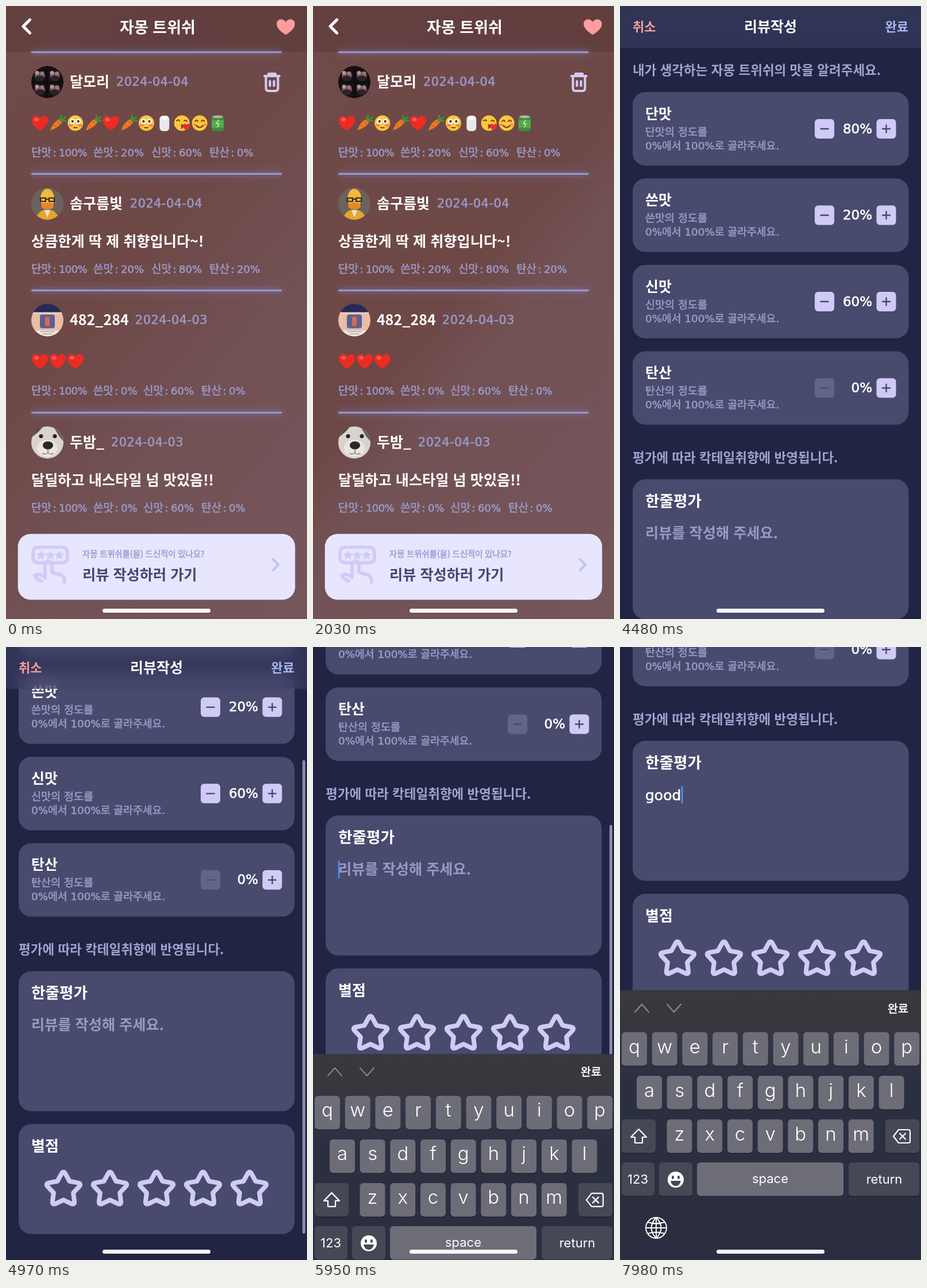
Recreate the animation shown at these times as an HTML page. Size 524 by 1068 pixels, loop 8 s.

```html
<!DOCTYPE html>
<html lang="ko">
<head>
<meta charset="utf-8">
<title>리뷰작성</title>
<style>
html, body { margin: 0; width: 100%; height: 100%; overflow: hidden; background: #212442; }
#stage { position: absolute; left: 0; top: 0; width: 524px; height: 1068px; overflow: hidden; }
#stage > *, #write > * { position: absolute; left: 0; top: 0; display: block; }
#review, #write { width: 524px; height: 1068px; overflow: hidden; }
#write { background: #212442; }
#head { width: 524px; height: 73px; background: rgba(62,67,102,.55); backdrop-filter: blur(11px); }
#bar { left: 516px; width: 5px; height: 825px; border-radius: 3px; background: #8b8ca8; }
#home { left: 168px; top: 1050px; width: 188px; height: 7px; border-radius: 4px; background: #f6f5f8; }
text { font-family: 'Noto Sans CJK KR', 'Noto Sans CJK', sans-serif; font-weight: 700; white-space: pre; }
.mix { font-family: 'DejaVu Sans', 'Noto Sans CJK KR', 'Noto Sans CJK', sans-serif; }
.mix, .mid { font-weight: 400; stroke-width: .65px; }
.key { font-family: Inter, sans-serif; font-weight: 300; }
.cap { font-family: Inter, sans-serif; font-weight: 400; }
</style>
</head>
<body>
<div id="stage">
  <div id="review"></div>
  <div id="write">
    <div id="page"></div>
    <div id="head"></div>
    <div id="bar"></div>
  </div>
  <div id="keys"></div>
  <div id="home"></div>
</div>
<script>
const $ = id => document.getElementById(id);
const svg = (h, body) => `<svg width="524" height="${h}" style="display:block">${body}</svg>`;
// The mix and mid classes get a thin outline for a medium weight
const text = (x, y, size, fill, s, cls = '', more = '') =>
  `<text x="${x}" y="${y}" font-size="${size}" fill="${fill}" class="${cls}" ` +
  `${cls[0] === 'm' ? `stroke="${fill}"` : ''} ${more}>${s}</text>`;
const rect = (x, y, w, h, r, fill) =>
  `<rect x="${x}" y="${y}" width="${w}" height="${h}" rx="${r}" fill="${fill}"/>`;
const circle = (x, y, r, fill) => `<circle cx="${x}" cy="${y}" r="${r}" fill="${fill}"/>`;
const oval = (x, y, a, b, fill) => `<ellipse cx="${x}" cy="${y}" rx="${a}" ry="${b}" fill="${fill}"/>`;
const shape = (d, fill) => `<path d="${d}" fill="${fill}"/>`;
const line = (d, color, w) =>
  `<path d="${d}" fill="none" stroke="${color}" stroke-width="${w}" stroke-linecap="round" stroke-linejoin="round"/>`;
const at = (x, y, body) => `<g transform="translate(${x} ${y})">${body}</g>`;
const MID = 'text-anchor="middle"', END = 'text-anchor="end"';

const DRINK = '자몽 트위쉬';
const LILAC = '#d0cbf6', MUTED = '#9a98c6', INK = '#45466f', CARD = '#484a6e';

// Star with softened tips, centred on 0,0
function star(R, r, soft) {
  const p = i => {
    const a = i * Math.PI / 5 - Math.PI / 2, k = i % 2 ? r : R;
    return [k * Math.cos(a), k * Math.sin(a)];
  };
  const mix = (a, b) => a.map((v, i) => (v + (b[i] - v) * soft).toFixed(2));
  let d = '';
  for (let i = 0; i < 10; i += 2) {
    const tip = p(i);
    d += `${i ? 'L' : 'M'}${mix(tip, p(i + 9))}Q${tip} ${mix(tip, p(i + 1))}L${p(i + 1)}`;
  }
  return d + 'Z';
}

/* ---- review list ---- */
const HEART = 'M0 13C-6 9-14 3-14-5C-14-14-3-15 0-8C3-15 14-14 14-5C14 3 6 9 0 13Z';
const face = circle(0, 0, 13.5, '#fcc73e');
const emoji = {
  h: shape(HEART, '#ee2b22') + oval(-6, -6, 4, 3, '#f9604f'),
  c: shape('M-13 13Q-8-2 3-7L8-2Q2 8-13 13Z', '#f07a22') + line('M-6 4l3 2M0-2l4 3', '#c9591a', 1.3) +
     line('M5-5L6-13M6-5L13-10M6-4L14-4', '#3f8f3a', 3.2),
  f: face + circle(-5, -3, 4.5, '#fff') + circle(5, -3, 4.5, '#fff') + circle(-5, -3, 2.2, '#54321b') +
     circle(5, -3, 2.2, '#54321b') + oval(-8, 4, 4, 2.5, '#f5894c') + oval(8, 4, 4, 2.5, '#f5894c') +
     line('M-3 8h6', '#7a4318', 2),
  m: rect(-8, -13, 17, 27, 6, '#e9e9ec') + oval(.5, -9, 6, 3, '#fff'),
  k: face + line('M-9-4q3-3 5 0M4-4q3-2 5 1', '#6d3c16', 2) + line('M-1 3q5 1 0 3q5 1 0 3', '#7a3a18', 1.8) +
     at(8, 7, `<g transform="scale(.45)">${shape(HEART, '#e92f2b')}</g>`),
  s: face + line('M-8-3q3-4 5 0M3-3q3-4 5 0M-6 4q6 7 12 0', '#6d3c16', 2) +
     oval(-9, 3, 3, 2, '#f5894c') + oval(9, 3, 3, 2, '#f5894c'),
  g: rect(-10, -13, 21, 27, 4, '#3d8f3c') + oval(.5, -11, 9, 2.5, '#a9b8a6') +
     rect(-10, -5, 21, 13, 0, '#55ab4b') + line('M2-5l-4 6h5l-3 6', '#c7eab5', 1.6)
};
const icons = s => [...s].map((c, i) => at(59 + 30.9 * i, 124, emoji[c])).join('');

const blob = (x, y) => oval(x, y, 9, 7, '#6f5153') + circle(x - 5, y - 5, 3.5, '#b39492') +
  circle(x + 4, y - 4, 3.5, '#96777a') + oval(x, y + 5, 8, 5, '#2a2227');
const avatars = [
  circle(0, 0, 28, '#141114') + [-13, 13].map(x => blob(x, -11) + blob(x, 13)).join('') +
    line('M0-27V27M-27 0H27', '#0c0a0c', 2),
  circle(0, 0, 28, '#6b625c') + oval(0, -9, 12, 17, '#f3b93a') + oval(0, 4, 11, 6, '#e8842a') +
    shape('M-18 21Q-12 9 0 11Q12 9 18 21Q0 35-18 21Z', '#e6a52f') + shape('M-5 11h10l-5 13z', '#eee6d8') +
    line('M-12-10h9v6h-9zM3-10h9v6h-9zM-3-8h6', '#2c2422', 2.2),
  circle(0, 0, 28, '#e9bda6') + shape('M-25-13A28 28 0 0 1 25-13Z', '#252a57') +
    rect(-25, -14, 50, 3, 0, '#f0cdb9') + rect(-13, -10, 26, 24, 4, '#596096') + rect(-4, -6, 8, 16, 2, '#d9694b') +
    shape('M-21 18H21Q12 28 0 28Q-12 28-21 18Z', '#f1ece9') + line('M-12 20h24M-8 24h16', '#b59a92', 1.5),
  circle(0, 0, 28, '#d8d4cd') + shape('M-26-10Q-21-24-8-27Q-15-18-26-10Z', '#5c4f4a') +
    shape('M12-25Q26-18 28-2L21-10Z', '#6c5d58') + oval(0, 10, 18, 15, '#e9e5df') +
    circle(-11, -11, 3.5, '#2a2325') + circle(13, -11, 3.5, '#2a2325') + oval(1, 5, 9, 7, '#2b2528') +
    line('M1 12v6q-5 4-9 1M1 18q5 4 9 1', '#8c7f79', 1.6)
];

function stats(values, y) {
  let x = 44;
  return ['단맛', '쓴맛', '신맛', '탄산'].map((name, i) => {
    const v = values[i] + '%', x0 = x;
    x += 59 + [0, 0, 28, 42, 49][v.length];
    return text(x0, y, 19, MUTED, name, 'mid') + text(x0 + 37.5, y, 18, MUTED, ':', 'mix') +
      text(x0 + 48, y, 18, MUTED, v, 'mix', v.length > 3 ? 'letter-spacing="-.6"' : '');
  }).join('');
}
const rows = [
  [80, '달모리', 192, '04', icons('hcfchcfmksg'), [100, 20, 60, 0], 182],
  [292, '솜구름빛', 216, '04', text(44, 127, 25.2, '#fff', '상큼한게 딱 제 취향입니다~!'), [100, 20, 80, 20], 173],
  [495, '482_284', 225, '03', icons('hhh'), [100, 0, 60, 0], 182],
  [708, '두밤_', 183, '03', text(44, 127, 25.2, '#fff', '달딜하고 내스타일 넘 맛있음!!'), [100, 0, 60, 0], 173]
];
const GLOW = 'drop-shadow(0 0 3px rgba(140,140,215,.5)) drop-shadow(0 0 8px rgba(140,140,215,.6))';
const list = rows.map(([y, name, dx, day, body, values, sy], i) => at(0, y,
  `<g style="filter:${GLOW}">${rect(44, -1, 436, 3, 1, '#9498cc')}</g>` +
  at(72, 52.5, avatars[i]) + text(111, 61, 25, '#fff', name) +
  text(dx, 59, 20.8, MUTED, '2024-04-' + day, 'mix', 'letter-spacing=".5"') + body + stats(values, sy))).join('');

const trash = line('M450 122H476M457 121V118H469V121M452.5 123V143Q452.5 148 457 148H469Q473.5 148 473.5 143V123' +
  'M459.5 131V139M466.5 131V139', LILAC, 4);
const tapIcon = `<g opacity=".95">${line('M57 943H97Q107 943 107 953V960Q107 970 97 970H57Q47 970 47 960V953Q47 943 57 943Z' +
  'M62 1002Q52 998 50 992Q59 987 68 996V973Q68 967 74 967Q80 967 80 973V987L95 991Q103 994 102 1004', LILAC, 6)}` +
  [61, 77, 93].map(x => at(x, 957, shape(star(9, 4.5, .1), LILAC))).join('') + '</g>';

$('review').innerHTML = svg(1068,
  rect(0, 0, 524, 80, 0, 'rgba(50,26,28,.2)') + list +
  line('M41.5 24L30 35.5L41.5 47', '#fff', 5.2) + text(264, 47, 27, '#fff', DRINK, '', MID) +
  at(487, 36.5, `<g transform="scale(1.13 1.05)">${shape(HEART, '#ff9c9e')}</g>`) + trash +
  rect(20.7, 919.8, 482.6, 114.6, 22, '#e7e6fe') + tapIcon +
  text(133, 960, 14.3, '#9da0d0', DRINK + '를(을) 드신적이 있나요?', 'mid') +
  text(133, 1000, 25.2, INK, '리뷰 작성하러 가기') +
  line('M465 964L474 973.5L465 983', '#c6c3ee', 4.2));

/* ---- review form ---- */
const button = (x, sign, off) => rect(x, 47, 34, 34, 6, off ? '#62648a' : LILAC) +
  line(`M${x + 10.5} 64h13` + (sign ? `M${x + 17} 57.5v13` : ''), off ? '#4a4b73' : INK, 2.4);
const taste = (name, value, i) => at(0, 150 + 150.5 * i,
  rect(22, 0, 480.5, 128, 22, CARD) + text(44, 46.5, 25, '#fff', name) +
  text(44, 75.5, 18.5, MUTED, name + '의 정도를', 'mix') +
  text(44, 99.5, 18.3, MUTED, '0%에서 100%로 골라주세요.', 'mix') +
  button(339, 0, !value) + button(446.5, 1) +
  text(439, 71.5, 23, '#fff', value + '%', 'mix', END));

$('page').innerHTML = svg(1420,
  text(22, 120, 22.5, '#a3a1d0', `내가 생각하는 ${DRINK}의 맛을 알려주세요.`) +
  [['단맛', 80], ['쓴맛', 20], ['신맛', 60], ['탄산', 0]].map(([n, v], i) => taste(n, v, i)).join('') +
  text(22, 795, 22.5, '#a3a1d0', '평가에 따라 칵테일취향에 반영됩니다.') +
  rect(22, 824.5, 480.5, 244, 22, CARD) + text(44, 872, 26.6, '#fff', '한줄평가') +
  text(44, 927, 25.2, MUTED, '리뷰를 작성해 주세요.', '', 'id="hint"') +
  text(44, 928, 25, '#fff', '', 'mix', 'id="typed"') +
  '<rect id="caret" y="903" width="2.6" height="31" rx="1" fill="#4b93f7"/>' +
  rect(22, 1091, 480.5, 191.5, 22, CARD) + text(44, 1139, 26, '#fff', '별점') +
  [0, 1, 2, 3, 4].map(i => at(100 + 81 * i, 1205, line(star(34, 18, .35), LILAC, 8))).join(''));

$('head').innerHTML = svg(73, text(22, 43.5, 22, '#f59b9d', '취소') +
  text(262, 44.5, 25, '#fff', '리뷰작성', '', MID) + text(502, 43.5, 22, '#a9b6f2', '완료', '', END));

/* ---- keyboard ---- */
const key = (x, y, w, fill) => rect(x, y + 1.5, w, 58.5, 6, '#1d202d') + rect(x, y, w, 58.5, 6, fill);
const LIGHT = '#6d6d78', DARK = '#464955';
const letters = [['qwertyuiop', 3, 73], ['asdfghjkl', 29, 149], ['zxcvbnm', 81.5, 225]].map(([s, x0, y]) =>
  [...s].map((c, i) => key(x0 + 52.7 * i, y, 44, LIGHT) +
    text(x0 + 22 + 52.7 * i, y + 36.5, 33, '#fff', c, 'key', MID)).join('')).join('');
const smile = circle(97, 330, 14, '#fff') + oval(92, 326, 2, 3, DARK) + oval(102, 326, 2, 3, DARK) +
  shape('M88 332H106Q104 341 97 341Q90 341 88 332Z', DARK);
const globe = line('M45 414a18 18 0 1 1 36 0a18 18 0 1 1-36 0M63 396V432M45 414H81M48.5 404Q63 409 77.5 404' +
  'M48.5 424Q63 419 77.5 424M63 396Q46 414 63 432M63 396Q80 414 63 432', '#fff', 1.9);

$('keys').innerHTML = svg(470,
  '<defs><linearGradient id="slab" x1="0" y1="0" x2="0" y2="1"><stop offset="0" stop-color="#38383d"/>' +
  '<stop offset=".12" stop-color="#37373e"/><stop offset=".2" stop-color="#343546"/>' +
  '<stop offset=".34" stop-color="#2b3041"/><stop offset="1" stop-color="#2b2e40"/></linearGradient></defs>' +
  rect(0, 0, 524, 470, 0, 'url(#slab)') +
  line('M26 38L38 24.5L50 38M82 24.5L94 38L106 24.5', '#87878c', 2.2) +
  text(502, 38.5, 19.5, '#fff', '완료', 'mid', END) + letters +
  key(3, 225, 59, DARK) + key(462, 225, 59, DARK) +
  line('M32.5 242L46 256H39V266H26V256H19Z', '#fff', 2.2) +
  line('M485 243H502Q505 243 505 246V263Q505 266 502 266H485L476 254.5ZM487 249.5L497 259.5M497 249.5L487 259.5', '#fff', 2.2) +
  key(3, 300, 57, DARK) + key(68, 300, 58, DARK) + key(134, 300, 255, LIGHT) + key(398, 300, 123, DARK) +
  text(31, 337, 22, '#fff', '123', 'cap', MID) + smile +
  text(261.5, 336, 22, '#fff', 'space', 'cap', MID) + text(460, 337, 22, '#fff', 'return', 'cap', MID) + globe);

/* ---- motion ---- */
const STEP = 70, LOOP = 8000;
const ramp = (t, start, dur) => Math.min(1, Math.max(0, (t - start) / dur));
const out = p => 1 - (1 - p) ** 3;
const inOut = p => p < .5 ? 4 * p ** 3 : 1 - 4 * (1 - p) ** 3;
const moveY = (id, y) => $(id).style.transform = `translateY(${y}px)`;
const STROKES = [6930, 7190, 7400, 7680];

function draw(t) {
  const drift = ramp(t, 560, 1680);
  $('review').style.background =
    `linear-gradient(130deg,#704a49 0%,#6d4846 ${40 + 8 * drift}%,#725154 ${64 - 8 * drift}%,#75565b 100%)`;

  moveY('write', 1068 * (1 - out(ramp(t, 2300, 640))));

  const lift = 371 * out(ramp(t, 5775, 593));
  const scroll = 290 * inOut(ramp(t, 4520, 640)) + lift;
  moveY('page', -scroll);
  moveY('head', -lift);
  moveY('keys', 1068 - 470 * out(ramp(t, 5775, 458)));

  const bar = $('bar').style;
  bar.top = (scroll < 290 ? 73 + scroll * .479 : 212 + lift * .405) + 'px';
  bar.opacity = ramp(t, 4520, 120) - ramp(t, 6650, 250);

  const n = STROKES.filter(s => t >= s).length;
  const typed = $('typed'), caret = $('caret');
  typed.textContent = 'good'.slice(0, n);
  $('hint').style.display = n ? 'none' : '';
  caret.setAttribute('x', n ? 44.5 + typed.getComputedTextLength() : 43.8);
  caret.style.opacity = t < 5790 ? 0 : n ? 1 : 1 - ramp(t, 6335, 140) + ramp(t, 6780, 130);
}

// The picture advances in even steps, like a screen recording
function tick(now) {
  draw(Math.floor(now % LOOP / STEP) * STEP);
  requestAnimationFrame(tick);
}
draw(0);
requestAnimationFrame(tick);
</script>
</body>
</html>
```
